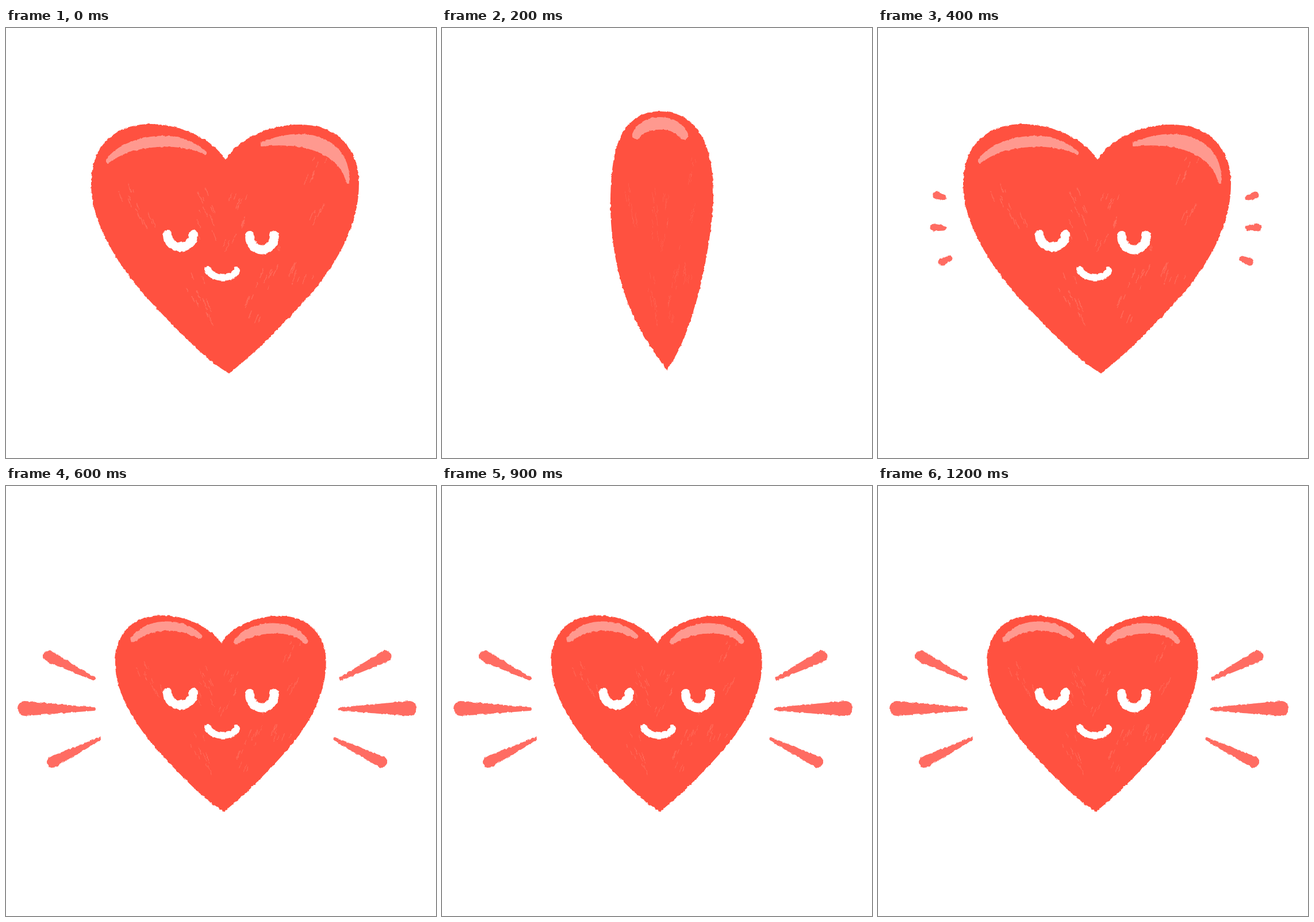
Recreate the animation shown at these times as an HTML page. Size 748 px wide and 748 px high, loop 1300 ms.

```html
<!DOCTYPE html>
<html lang="en">
<head>
<meta charset="utf-8">
<title>Beating heart</title>
<style>
  html, body { margin: 0; width: 100%; height: 100%; overflow: hidden; background: #fff; }
  svg { display: block; width: 100vw; height: 100vh; }
  path { stroke-linecap: round; stroke-linejoin: round; }
  #shine path { fill: #ff998f; stroke: #ff998f; }
  #streaks { fill: none; stroke: #ff8a7a; stroke-width: 1.2; opacity: .5; }
  #face { fill: none; stroke: #fff; stroke-width: 16; }
</style>
</head>
<body>
<svg viewBox="0 0 748 748">
  <filter id="rough" x="0" y="0" width="748" height="748" filterUnits="userSpaceOnUse" color-interpolation-filters="sRGB">
    <feTurbulence type="fractalNoise" baseFrequency=".16" numOctaves="2" seed="4"/>
    <feDisplacementMap in="SourceGraphic" scale="4" xChannelSelector="R" yChannelSelector="G"/>
  </filter>
  <g filter="url(#rough)">
    <g id="body">
      <path id="heart" fill="#ff5140"/>
      <path id="streaks"/>
    </g>
    <g id="shine"><path/><path/></g>
    <g id="face">
      <path d="M281 360C282 388 325 388 326 359"/>
      <path d="M424 361C424 394 466 394 467 360"/>
      <path stroke-width="12" d="M351 420C358 438 395 438 401 422"/>
    </g>
    <path id="rays" fill="#ff6c62"/>
  </g>
</svg>
<script>
const $ = id => document.getElementById(id);

// Outlines share one command structure so they can be blended.
const front = {
  heart: 'M382 229C400 196 455 168 510 168C575 168 614 208 614 270C614 340 580 402 535 457C490 508 440 560 388 601C345 575 300 528 255 480C195 415 148 340 148 272C148 208 185 168 250 167C310 168 360 195 382 229Z',
  shine: ['M177 230C205 190 300 172 346 217C300 195 220 200 177 232Z',
          'M445 202C510 172 595 185 595 267C580 215 520 195 445 203Z'],
  line: 6
};
const edgeShine = 'M338 186C350 154 410 154 421 187C400 164 358 164 338 186Z';
const edge = {
  heart: 'M378 145C395 145 415 149 432 163C462 190 472 235 472 290C472 335 460 405 449 450C440 490 418 560 391 595C365 560 340 520 326 485C305 430 293 370 293 305C293 240 302 185 330 163C343 150 360 145 378 145Z',
  shine: [edgeShine, edgeShine],
  line: 14
};
const small = {
  heart: front.heart,
  shine: ['M221 266C245 234 305 230 337 262C300 240 255 243 221 267Z',
          'M401 270C430 234 500 234 521 270C500 245 435 247 401 271Z'],
  line: 9
};

// Each ray: outer x, y, radius, inner x, y, radius
const shortRays = [[102, 291, 6.5, 114, 295, 4.5], [97, 347, 6.5, 114, 348, 4.5], [111, 407, 6.5, 125, 401, 4.5]];
const longRays = [[74, 296, 10, 152, 335, 3], [33, 387, 13, 153, 388, 3], [81, 480, 10, 163, 440, 3]];

// Per 100 ms step: turn towards the edge, shrink, rays shown
const beat = [[0, 0, 1], [0, .5, 1], [0, 1, 1]];
const poses = [[0, 0, 0], [.5, 0, 0], [1, 0, 0], [.5, 0, 0], ...beat, ...beat, ...beat];

const mix = (a, b, t) => a + (b - a) * t;

function mixPath(a, b, t) {
  const ends = b.match(/[\d.]+/g);
  let i = 0;
  return a.replace(/[\d.]+/g, n => mix(+n, +ends[i++], t));
}

function drop(x, y, r, x2, y2, r2) {
  const len = Math.hypot(x2 - x, y2 - y), nx = (y - y2) / len, ny = (x2 - x) / len;
  const at = (px, py, k) => `${px + nx * k} ${py + ny * k}`;
  const arc = k => `A${k} ${k} 0 0 1 `;
  return `M${at(x, y, r)}${arc(r)}${at(x, y, -r)}L${at(x2, y2, -r2)}${arc(r2)}${at(x2, y2, r2)}Z`;
}

function rays(t) {
  const mirror = mix(758, 734.5, t);
  return shortRays.map((ray, i) => {
    const [x, y, r, x2, y2, r2] = ray.map((v, k) => mix(v, longRays[i][k], t));
    return drop(x, y, r, x2, y2, r2) + drop(mirror - x, y, r, mirror - x2, y2, r2);
  }).join('');
}

// Faint crayon strokes in loose clusters
function streaks() {
  let seed = 7;
  const rand = () => (seed = seed * 16807 % 2147483647) / 2147483647;
  const spots = [[205, 290], [240, 315], [350, 292], [405, 292], [540, 240], [345, 335], [400, 350],
                 [448, 440], [340, 478], [425, 480], [545, 315], [490, 400], [325, 445], [520, 430]];
  let d = '';
  for (const [x, y] of spots) {
    const lean = x < 382 ? .4 : -.4;
    for (let i = 0; i < 6; i++) {
      const len = 5 + rand() * 15;
      d += `M${x + (rand() - .5) * 36} ${y + (rand() - .5) * 44}l${len * lean} ${len}`;
    }
  }
  return d;
}

function draw([turn, shrink, lit]) {
  const to = turn ? edge : small, t = turn || shrink;
  const size = mix(1, .787, shrink);
  $('heart').setAttribute('d', mixPath(front.heart, to.heart, t));
  $('body').setAttribute('transform', `matrix(${size} 0 0 ${size} ${73.5 * shrink} ${93.6 * shrink})`);
  $('streaks').setAttribute('transform', `translate(382) scale(${mix(1, .34, turn)} 1) translate(-382)`);
  [...$('shine').children].forEach((p, i) => {
    p.setAttribute('d', mixPath(front.shine[i], to.shine[i], t));
    p.setAttribute('stroke-width', mix(front.line, to.line, t));
  });
  $('face').setAttribute('transform', `translate(380) scale(${1 - turn * .62} 1) translate(-380)`);
  $('face').style.display = turn === 1 ? 'none' : '';
  $('rays').setAttribute('d', lit ? rays(shrink) : '');
}

$('streaks').setAttribute('d', streaks());

const start = performance.now();
let shown = -1;
function tick() {
  const step = Math.floor((performance.now() - start) / 100) % poses.length;
  if (step !== shown) draw(poses[shown = step]);
  requestAnimationFrame(tick);
}
tick();
</script>
</body>
</html>
```
